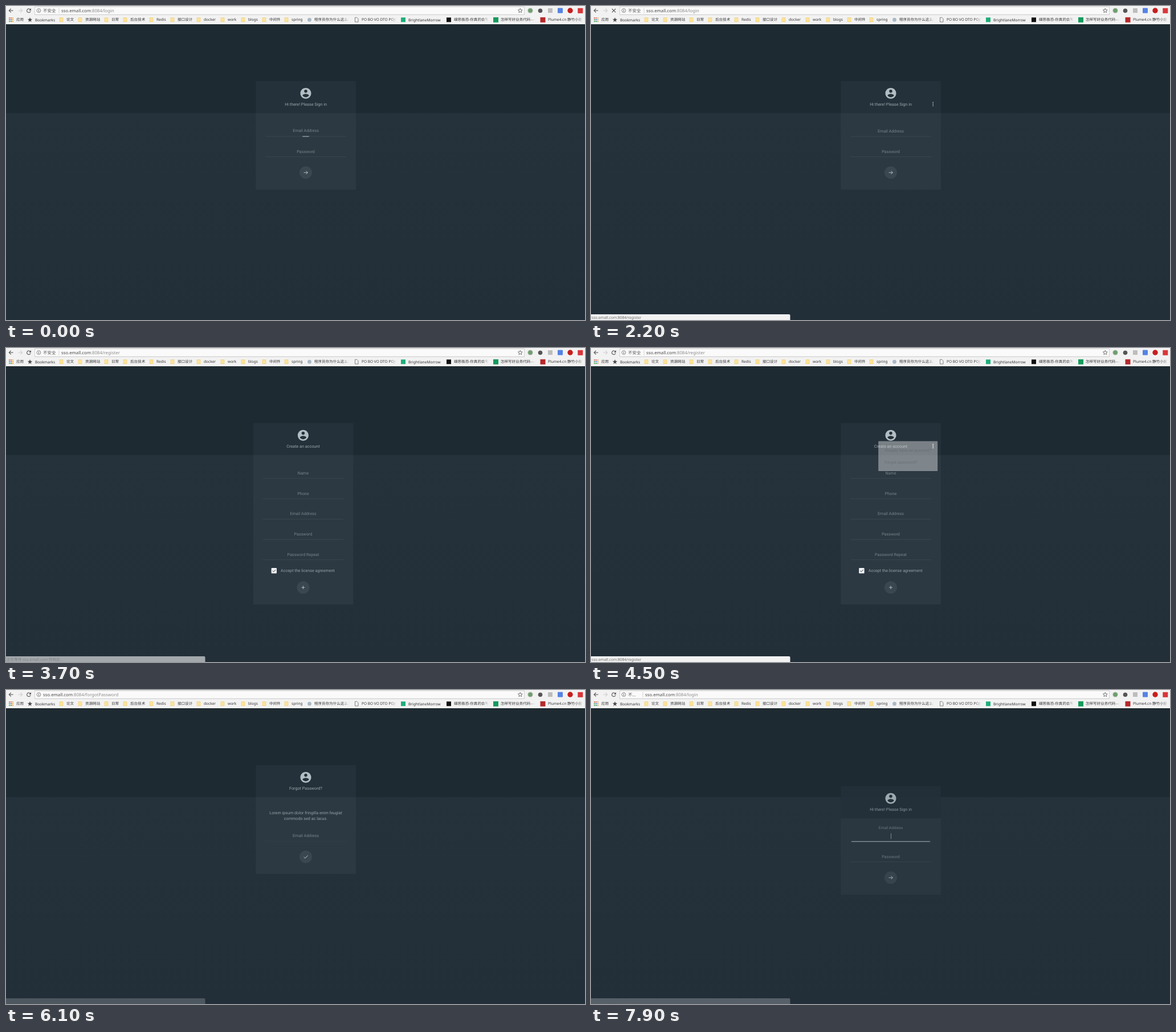
Recreate the animation shown at these times as an HTML page with a canvas. Size 1016 by 551 pixels, loop 8000 ms.

```html
<!DOCTYPE html>
<html lang="zh-CN">
<head>
<meta charset="utf-8">
<title>Sign in flow</title>
<style>
html, body { margin: 0; width: 100%; height: 100%; overflow: hidden; background: #23303a; }
canvas { display: block; width: 100vw; height: 100vh; }
</style>
</head>
<body>
<canvas id="stage" width="1016" height="551"></canvas>
<script>
const ctx = document.getElementById('stage').getContext('2d');
const W = 1016, H = 551, LOOP = 8000, STEP = 100;
const UI = "'Noto Sans', 'Noto Sans CJK SC', 'Noto Sans CJK', sans-serif";
const FORM = "Roboto, sans-serif";
const HOST = 'sso.emall.com';
const ADDRESS = HOST + ':8084/';
const WAIT_HOST = '正在等待 ' + HOST + ' 的响应...';
const WAIT_EXT = '正在等待扩展程序“Calmpane Neo”...';

// Each cue changes part of the state from its time on.
const cues = [
  [0, { page: 'login', url: 'login', chip: 32, busy: false, dots: 0, menu: 0, hover: -1,
        status: '', bar: 0, born: -1000, shift: 0, focus: 0.08 }],
  [100, { focus: 0 }],
  [800, { dots: 0.6 }],
  [1100, { dots: 1, status: ADDRESS + 'login', bar: 0.3 }],
  [1200, { bar: 0.7 }],
  [1300, { bar: 1 }],
  [1400, { menu: 0.4 }],
  [1500, { menu: 0.82 }],
  [1600, { menu: 1 }],
  [1700, { hover: 0, status: ADDRESS + 'register' }],
  [2200, { menu: 0, hover: -1, dots: 0.6, busy: true }],
  [2400, { status: WAIT_HOST }],
  [3000, { dots: 0 }],
  [3200, { url: 'register', chip: 0 }],
  [3400, { page: '', busy: false }],
  [3500, { page: 'register', born: 3500, shift: -4.6, chip: 18 }],
  [3600, { chip: 30 }],
  [3700, { chip: 32, bar: 0.62 }],
  [3800, { bar: 0 }],
  [4000, { shift: 0, dots: 0.6 }],
  [4100, { dots: 1, status: ADDRESS + 'register', bar: 0.3 }],
  [4200, { bar: 0.7 }],
  [4300, { bar: 1 }],
  [4500, { menu: 0.4 }],
  [4600, { menu: 0.82 }],
  [4700, { menu: 1 }],
  [4800, { hover: 0, status: ADDRESS + 'login' }],
  [4900, { hover: 1, status: ADDRESS + 'forgotPassword' }],
  [5400, { menu: 0, hover: -1, dots: 0.6, busy: true }],
  [5500, { status: WAIT_HOST }],
  [5600, { url: 'forgotPassword', chip: 0 }],
  [5700, { page: '', dots: 0 }],
  [5800, { page: 'forgot', born: 5800, status: WAIT_EXT }],
  [5900, { busy: false }],
  [6000, { bar: 0.6 }],
  [6100, { bar: 0.2 }],
  [6200, { bar: 0 }],
  [6300, { dots: 0.6 }],
  [6400, { dots: 1, status: ADDRESS + 'forgotPassword', bar: 0.3 }],
  [6500, { bar: 0.7 }],
  [6600, { bar: 1 }],
  [6800, { menu: 0.4 }],
  [6900, { menu: 0.82 }],
  [7000, { menu: 1 }],
  [7100, { hover: 0, status: ADDRESS + 'login' }],
  [7600, { menu: 0, hover: -1, dots: 0, busy: true }],
  [7700, { url: 'login', chip: 0 }],
  [7800, { page: '', busy: false, chip: 18, bar: 0.6 }],
  [7900, { page: 'login', born: 7900, chip: 30, focus: 0.97, bar: 0.25 }]
];

const pages = {
  login: { title: 'Hi there! Please Sign in', bottom: 322.3, fields: ['Email Address', 'Password'],
           first: 219.5, button: 292.3, mark: 'arrow', menu: ['Create an account', 'Forgot password?'] },
  register: { title: 'Create an account', bottom: 450,
              fields: ['Name', 'Phone', 'Email Address', 'Password', 'Password Repeat'],
              first: 219.5, button: 420.2, mark: 'plus', menu: ['Already have an account?', 'Forgot password?'] },
  forgot: { title: 'Forgot Password?', bottom: 322.8, fields: ['Email Address'],
            first: 255.8, button: 292.8, mark: 'check', menu: ['Already have an account?', 'Create an account'] }
};

const avatar = new Path2D('M12 2C6.48 2 2 6.48 2 12s4.48 10 10 10 10-4.48 10-10S17.52 2 12 2z' +
  'm0 3c1.66 0 3 1.34 3 3s-1.34 3-3 3-3-1.34-3-3 1.34-3 3-3z' +
  'm0 14.2c-2.5 0-4.71-1.28-6-3.22.03-1.99 4-3.08 6-3.08 1.99 0 5.97 1.09 6 3.08-1.29 1.94-3.5 3.22-6 3.22z');

function rect(x, y, w, h, fill, r = 0) {
  ctx.fillStyle = fill;
  ctx.beginPath();
  ctx.roundRect(x, y, w, h, r);
  ctx.fill();
}
function disc(x, y, r, fill) {
  ctx.fillStyle = fill;
  ctx.beginPath();
  ctx.arc(x, y, r, 0, 7);
  ctx.fill();
}
function line(points, color, width = 1) {
  ctx.strokeStyle = color;
  ctx.lineWidth = width;
  ctx.beginPath();
  points.forEach(([x, y], i) => i ? ctx.lineTo(x, y) : ctx.moveTo(x, y));
  ctx.stroke();
}
function text(s, x, mid, size, color, family = UI, align = 'left') {
  ctx.font = size + 'px ' + family;
  ctx.textAlign = align;
  ctx.fillStyle = color;
  ctx.fillText(s, x, mid + size * 0.35);
  return ctx.measureText(s).width;
}
function star(x, y, r, inner) {
  ctx.beginPath();
  for (let i = 0; i < 10; i++) {
    const a = i * Math.PI / 5 - Math.PI / 2, d = i % 2 ? r * inner : r;
    ctx.lineTo(x + d * Math.cos(a), y + d * Math.sin(a));
  }
  ctx.closePath();
}

function navArrow(x, dir, color) {
  line([[x - 3.6, 8], [x + 3.6, 8]], color, 1.1);
  line([[x + dir * 0.3, 4.6], [x + dir * 3.7, 8], [x + dir * 0.3, 11.4]], color, 1.1);
}

function toolbar(s) {
  rect(0, 0, W, 32, '#f2f2f2');
  navArrow(9, -1, '#555');
  navArrow(25, 1, '#cfcfcf');
  if (s.busy) {
    line([[36.8, 4.8], [43.2, 11.2]], '#555', 1.2);
    line([[43.2, 4.8], [36.8, 11.2]], '#555', 1.2);
  } else {
    ctx.strokeStyle = '#555';
    ctx.lineWidth = 1.1;
    ctx.beginPath();
    ctx.arc(40, 8.1, 3.3, 0.3, 5.4);
    ctx.stroke();
    ctx.fillStyle = '#555';
    ctx.beginPath();
    ctx.moveTo(44, 4); ctx.lineTo(44, 7.8); ctx.lineTo(40.2, 7.8);
    ctx.fill();
  }

  rect(50, 0.8, 860, 14.6, '#b9b9b9', 1.5);
  rect(50.6, 1.4, 858.8, 13.4, '#fafafa', 1.2);
  ctx.strokeStyle = '#666';
  ctx.lineWidth = 0.8;
  ctx.beginPath();
  ctx.arc(57.5, 8, 3.4, 0, 7);
  ctx.stroke();
  line([[57.5, 7.3], [57.5, 10]], '#555', 0.9);
  line([[57.5, 5.8], [57.5, 6.6]], '#555', 0.9);
  if (s.chip) {
    text(s.chip < 32 ? '不...' : '不安全', 65, 8.2, 7.5, '#555');
    line([[61 + s.chip, 3.5], [61 + s.chip, 13]], '#ccc', 0.8);
  }
  const x = 65 + s.chip;
  const w = text(HOST, x, 8, 7.75, '#484848');
  text(':8084/' + s.url, x + w, 8, 7.75, '#8c8c8c');
  star(902.3, 8.2, 4.1, 0.45);
  ctx.strokeStyle = '#555';
  ctx.lineWidth = 0.8;
  ctx.stroke();

  disc(920, 8, 4.6, '#a9b5a9');
  disc(920, 8, 3.6, '#6c9f6c');
  disc(937.5, 8.3, 3.8, '#555');
  rect(951, 4, 8, 8, '#bdbdbd');
  rect(968, 3.5, 9, 9, '#5583e4', 1);
  disc(990, 8, 4.7, '#c81d1d');
  rect(1003.3, 3.8, 9, 9, '#d9363a', 0.5);
}

function clipped(s, x) {
  const fade = ctx.createLinearGradient(x + 50, 0, x + 61, 0);
  fade.addColorStop(0, '#333');
  fade.addColorStop(1, 'rgba(51,51,51,0)');
  text(s, x, 24.2, 6.55, fade);
}

function bookmarks() {
  const dots = ['#d9534a', '#d9534a', '#e0a23c', '#4a9d5b', '#4f7fe0', '#e0a23c', '#4a9d5b', '#4a9d5b', '#e0a23c'];
  dots.forEach((c, i) => rect(5.2 + i % 3 * 2.9, 20.2 + Math.floor(i / 3) * 2.9, 1.9, 1.9, c));
  text('应用', 18, 24.2, 6.55, '#333');
  star(42, 24.4, 4.3, 0.45);
  ctx.fillStyle = '#4d4d4d';
  ctx.fill();
  text('Bookmarks', 51, 24.2, 6.6, '#333');
  const folders = { 论文: 106, 资源网站: 139, 日常: 185, 后台技术: 218, Redis: 264, 接口设计: 301,
    docker: 347, work: 389, blogs: 425, 中间件: 462, spring: 501 };
  for (const [name, x] of Object.entries(folders)) {
    rect(x - 12.3, 20.2, 6.6, 7.8, '#e8c769', 0.6);
    rect(x - 11.8, 20.7, 5.6, 6.8, '#fde399', 0.3);
    text(name, x, 24.2, 6.55, '#333');
  }
  disc(532.5, 24.2, 3.4, '#a9b8c6');
  clipped('程序员你为什么这么累', 541);
  line([[612.5, 20.2], [615.8, 20.2], [618, 22.4], [618, 28], [612.5, 28], [612.5, 20.2]], '#666', 0.8);
  clipped('PO BO VO DTO POJO', 624);
  rect(693, 20.2, 8, 8, '#1fae7a');
  text('BrightlaneMorrow', 706, 24.2, 6.6, '#333');
  rect(773, 20.2, 8, 8, '#111');
  clipped('细思极恐-你真的会写java吗', 786);
  rect(855, 19.8, 9, 9, '#159a5c');
  clipped('怎样写好业务代码——', 868);
  rect(937.5, 19.8, 9, 9, '#b5292b');
  clipped('Plume4.cn 静竹小屋 - ', 951);
}

function backdrop() {
  const low = ctx.createLinearGradient(0, 188, 0, H);
  low.addColorStop(0, '#25323b');
  low.addColorStop(1, '#222f39');
  rect(0, 188, W, H - 188, low);
  rect(0, 32, W, 156, '#1e2a31');
}

function field(label, y, ruleY, focus, faint) {
  const rule = faint ? 'rgba(255,255,255,0.035)' : 'rgba(255,255,255,0.09)';
  line([[455.5, ruleY], [597, ruleY]], rule, 0.8);
  text(label, 526, y - 15.5 * focus, 7.2 - 0.6 * focus, '#77848b', FORM, 'center');
  if (focus) {
    const half = 71 * focus;
    line([[526 - half, ruleY], [526 + half, ruleY]], '#b9c2c6', 1);
    if (focus > 0.5) line([[526.5, 214.5], [526.5, 224.5]], '#a5b0b5', 0.8);
  }
}

function button(y, mark) {
  disc(526, y, 11, '#3a4750');
  const c = '#c3cbcf';
  if (mark === 'arrow') {
    line([[522.6, y], [529.2, y]], c, 0.9);
    line([[526.6, y - 2.8], [529.4, y], [526.6, y + 2.8]], c, 0.9);
  } else if (mark === 'plus') {
    line([[523.2, y], [528.8, y]], c, 0.9);
    line([[526, y - 2.8], [526, y + 2.8]], c, 0.9);
  } else {
    line([[522.6, y + 0.2], [524.8, y + 2.4], [529.6, y - 2.4]], c, 1);
  }
}

function card(s, t) {
  const page = pages[s.page];
  const p = Math.min(1, (t - s.born) / 200);
  ctx.save();
  ctx.globalAlpha = 0.85 + 0.15 * p;
  ctx.translate(s.shift, 37 * (1 - p) ** 2);
  rect(438.3, 131.8, 175.7, 56.2, '#24313a', [1, 1, 0, 0]);
  rect(438.3, 188, 175.7, page.bottom - 188, '#2c3942', [0, 0, 1, 1]);

  ctx.save();
  ctx.translate(526 - 11.4, 153.3 - 11.4);
  ctx.scale(0.95, 0.95);
  ctx.fillStyle = '#b2bec3';
  ctx.fill(avatar, 'evenodd');
  ctx.restore();
  text(page.title, 526, 172.4, 7.22, '#9ba7ad', FORM, 'center');

  const forgot = s.page === 'forgot';
  if (forgot) {
    text('Lorem ipsum dolor fringilla enim feugiat', 526, 215.2, 7.2, '#95a1a7', FORM, 'center');
    text('commodo sed ac lacus.', 526, 225, 7.2, '#95a1a7', FORM, 'center');
  }
  page.fields.forEach((label, i) => {
    const y = page.first + i * 35.7;
    field(label, y, y + 9.4, s.page === 'login' && !i ? s.focus : 0, forgot);
  });
  if (s.page === 'register') {
    rect(470.2, 386, 9.4, 9.4, '#f1f3f4', 1);
    line([[472.2, 390.8], [474.2, 392.7], [477.8, 388.9]], '#2c3942', 1);
    text('Accept the license agreement', 486.7, 390.8, 7.2, '#95a1a7', FORM);
  }
  button(page.button, page.mark);
  ctx.restore();

  if (s.dots) {
    const c = s.dots < 1 ? '#a4afb4' : '#ffffff';
    for (let i = -1; i <= 1; i++) disc(600.2, 172.2 + i * 2.9, 0.95, c);
  }
  if (s.menu) menu(page.menu, s);
}

function menu(items, s) {
  ctx.save();
  ctx.globalAlpha = s.menu;
  ctx.shadowColor = 'rgba(0,0,0,0.2)';
  ctx.shadowBlur = 3;
  rect(504.2, 163.5, 104, 52.4, '#fff', 1);
  ctx.shadowColor = 'transparent';
  if (s.hover >= 0) rect(504.2, 169.3 + s.hover * 20.6, 104, 20.6, '#f2f3f3');
  items.forEach((item, i) => text(item, 515, 179.8 + i * 20.7, 7.22, '#46545c', FORM));
  ctx.restore();
}

function statusBar(s) {
  if (!s.bar) return;
  ctx.save();
  ctx.globalAlpha = s.bar;
  rect(0, 541, 349.5, 10, '#f2f2f2', [0, 2, 0, 0]);
  text(s.status, 1, 546.4, 6.6, '#686868');
  ctx.restore();
}

function draw(now) {
  const t = Math.floor(now % LOOP / STEP) * STEP;
  const s = Object.assign({}, ...cues.filter(c => c[0] <= t).map(c => c[1]));
  ctx.textRendering = 'geometricPrecision';
  backdrop();
  if (s.page) card(s, t);
  toolbar(s);
  bookmarks();
  statusBar(s);
}

const start = performance.now();
function tick() {
  draw(performance.now() - start);
  requestAnimationFrame(tick);
}
tick();
</script>
</body>
</html>
```
